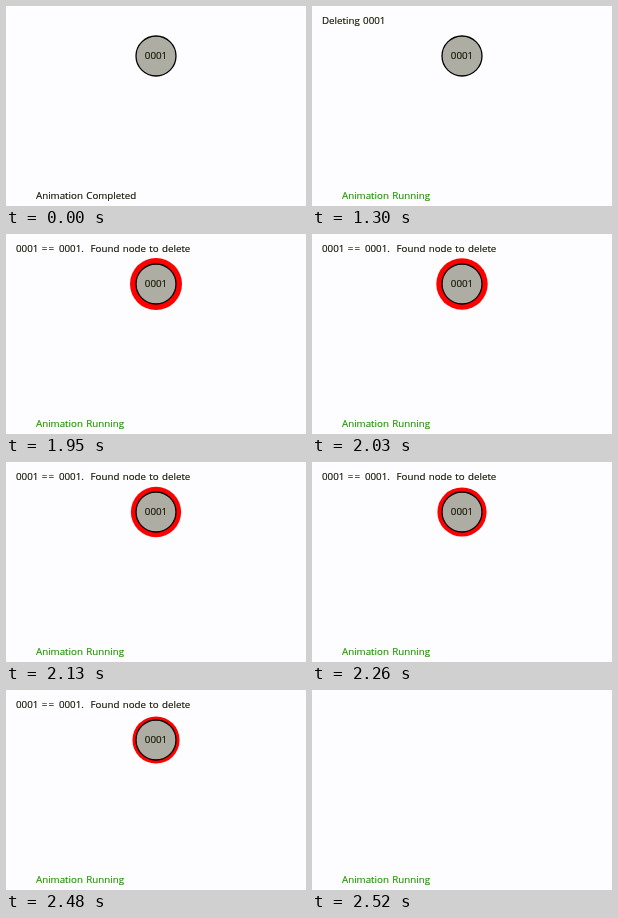
An HTML page that plays this animation: 300 by 200 pixels, repeating every 4020 ms.

```html
<!DOCTYPE html>
<html lang="en">
<head>
<meta charset="utf-8">
<title>Node deletion</title>
<style>
  html, body { margin: 0; width: 100%; height: 100%; overflow: hidden; background: #fdfdff; }
  svg { display: block; width: 100%; height: 100%; }
  text {
    font: 9.75px "Open Sans", "Noto Sans", sans-serif;
    word-spacing: .8px;
    white-space: pre;
    fill: #141400;
    stroke: #141400;
    stroke-width: .15px;
  }
  .running { fill: #209400; stroke: #209400; }
  .wide { letter-spacing: 1.4px; }
</style>
</head>
<body>
<svg viewBox="0 0 300 200">
  <g id="node">
    <circle id="ring" cx="150" cy="50" r="26" fill="#f00"/>
    <circle cx="150" cy="50" r="20" fill="#adada4" stroke="#000" stroke-width="1.3"/>
    <text x="150" y="53.3" text-anchor="middle">0001</text>
  </g>
  <text id="deleting" x="10" y="18">Deleting 0001</text>
  <text id="found" x="10" y="18">0001 <tspan class="wide">==</tspan> 0001.  Found node to delete</text>
  <text id="status" x="30" y="193"></text>
</svg>
<script>
  const LOOP = 4020, START = 1300, FOUND = 1950, REMOVED = 2520;
  const STEP = 30;
  const get = id => document.getElementById(id);
  const node = get("node"), ring = get("ring"), status = get("status");
  const deleting = get("deleting"), found = get("found");

  const show = (el, on) => el.setAttribute("visibility", on ? "inherit" : "hidden");

  function draw(t) {
    const running = t >= START;
    const highlighted = t >= FOUND && t < REMOVED;
    show(node, t < REMOVED);
    show(ring, highlighted);
    show(deleting, running && t < FOUND);
    show(found, highlighted);

    // The highlight shrinks one pixel every seven ticks.
    const ticks = Math.floor(Math.max(0, t - FOUND) / STEP);
    ring.setAttribute("r", 26 - ticks / 7);

    status.textContent = running ? "Animation Running" : "Animation Completed";
    status.classList.toggle("running", running);
  }

  const origin = performance.now();
  function tick() {
    draw((performance.now() - origin) % LOOP);
    requestAnimationFrame(tick);
  }
  tick();
</script>
</body>
</html>
```
